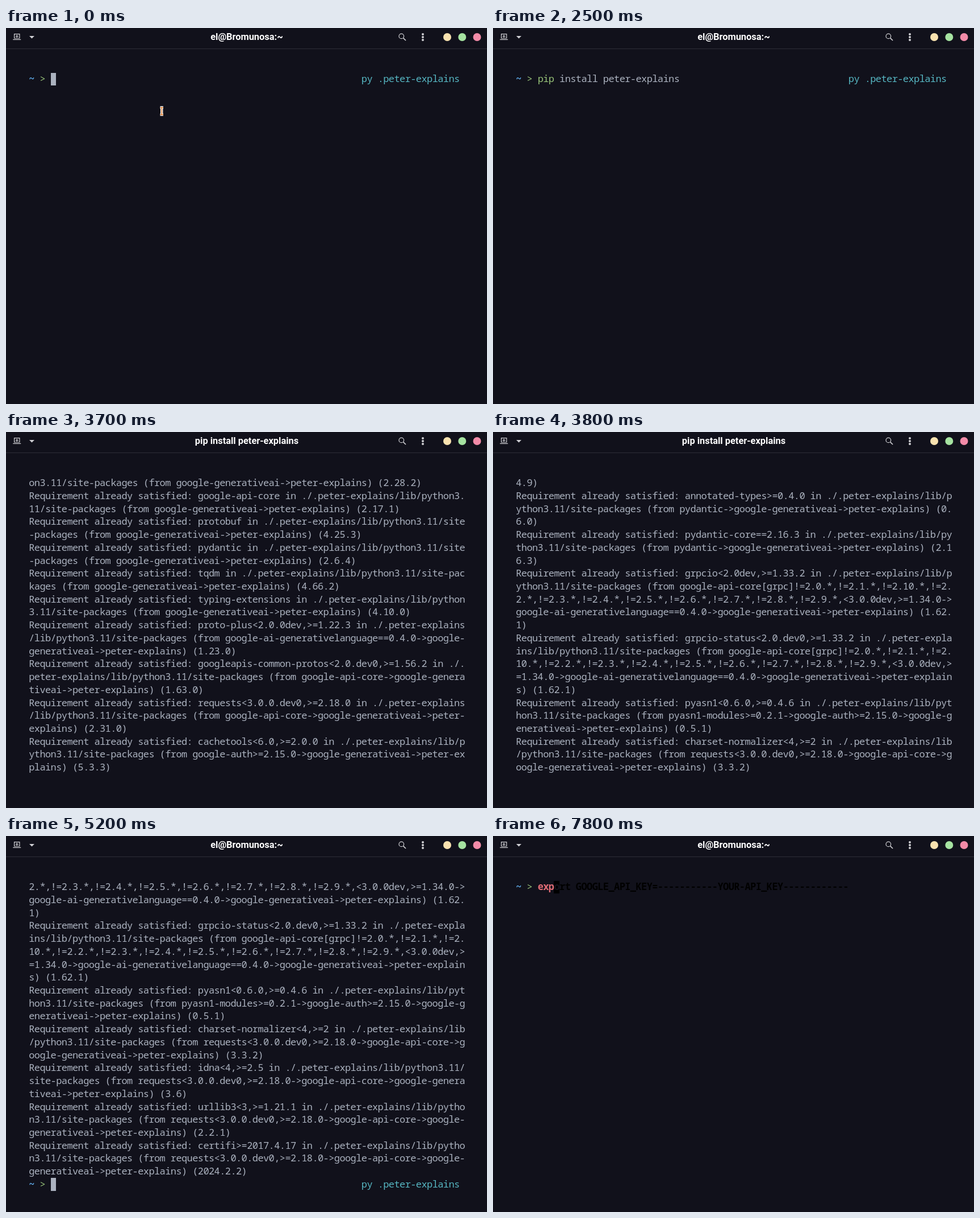
An HTML page for the animation above (8 s loop, 847 by 661 pixels).

```html
<!DOCTYPE html>
<html lang="en">
<head>
<meta charset="utf-8">
<title>Terminal</title>
<style>
  html, body { margin: 0; width: 100%; height: 100%; overflow: hidden; background: #11111b; }
  #stage { position: relative; width: 847px; height: 661px; overflow: hidden; background: #11111b; }
  svg { position: absolute; left: 0; top: 0; }
  #title { font: 700 16.4px Roboto, sans-serif; fill: #fff; text-anchor: middle; }
  #screen {
    position: absolute; left: 40.2px; top: 78.3px; margin: 0;
    font: 17px/22.72px "Noto Sans Mono", monospace; letter-spacing: -.6px;
    font-variant-ligatures: none; color: #abb2bf;
  }
  #cursor { position: absolute; width: 9.6px; height: 22.4px; }
  .dir { color: #61afef; font-weight: 700; }
  .ok { color: #98c379; }
  .bad { color: #e06c75; font-weight: 700; }
  .env { color: #56b6c2; }
  .ghost { color: #000; font-weight: 700; }
  .under { color: #11111b; }
</style>
</head>
<body>
<div id="stage">
  <div id="cursor"></div>
  <pre id="screen"></pre>
  <svg width="847" height="661" fill="none">
    <path d="M0 36.5H847" stroke="#2d2d37"/>
    <g stroke="#d0d0d4" stroke-width="1.2">
      <path d="M14.6 18V10.6H23.9V18ZM12.3 20.3H26.2M19.2 12V17M16.7 14.5H21.8"/>
      <circle cx="696.3" cy="14.4" r="4.3"/>
      <path d="M699.5 17.6L704 22" stroke-width="1.6"/>
    </g>
    <g fill="#d0d0d4">
      <path d="M41 14H50L45.5 18.5Z"/>
      <circle cx="734" cy="11" r="2"/><circle cx="734" cy="16" r="2"/><circle cx="734" cy="21" r="2"/>
    </g>
    <circle cx="777" cy="16" r="7" fill="#f9e2af"/>
    <circle cx="803.3" cy="16" r="7" fill="#a6e3a1"/>
    <circle cx="829.5" cy="16" r="7" fill="#f38ba8"/>
    <text id="title" x="424" y="21"></text>
    <g id="mouse">
      <path id="beam" d="M271.5 139.8H276.9M274.2 139.8V152.4M271.5 152.4H276.9" stroke="#fff" stroke-width="4.4" stroke-linejoin="round"/>
      <path d="M271.5 139.8H276.9M274.2 139.8V152.4M271.5 152.4H276.9" stroke="#d9803a" stroke-width="1.6"/>
    </g>
  </svg>
</div>
<script>
const LOOP = 8000, COLS = 80, CELL_W = 9.6, CELL_H = 22.72, LEFT = 40.2, TOP = 78.8;
const HOME = 'el@Bromunosa:~', INSTALL = 'pip install peter-explains';
const EXPORT = 'export GOOGLE_API_KEY=' + '-'.repeat(11) + 'YOUR-API_KEY' + '-'.repeat(12);

const $ = id => document.getElementById(id);
const esc = s => s.replace(/&/g, '&amp;').replace(/</g, '&lt;').replace(/>/g, '&gt;');
const span = (cls, s) => `<span class="${cls}">${esc(s)}</span>`;

// Prompt line: typed part, greyed-out suggestion, then the right-hand prompt if it fits.
function prompt(typed, full = typed) {
  const word = typed.split(' ')[0], rest = full.slice(typed.length);
  const used = 4 + full.length;
  return span('dir', '~') + ' ' + span('ok', '>') + ' ' +
    span(word === 'pip' ? 'ok' : 'bad', word) + esc(typed.slice(word.length)) +
    span('ghost under', rest.slice(0, 1)) + span('ghost', rest.slice(1)) +
    (used < 61 ? ' '.repeat(61 - used) + span('env', 'py .peter-explains') : '');
}

// Dependency chains, innermost last
const ROOT = 'peter-explains', GEN = 'google-generativeai->' + ROOT;
const LANG = 'google-ai-generativelanguage==0.4.0->' + GEN;
const AUTH = 'google-auth>=2.15.0->' + GEN, CORE = 'google-api-core->' + GEN;
const SKIP = [0, 1, 10, 2, 3, 4, 5, 6, 7, 8, 9].map(n => `!=2.${n}.*`).join();
const GRPC = `google-api-core[grpc]${SKIP},<3.0.0dev,>=1.34.0->${LANG}`;
const REQ = 'requests<3.0.0.dev0,>=2.18.0->' + CORE;

const packages = [
  ['peter-explains', '', '0.0.5'],
  ['colorama', ROOT, '0.4.6'],
  ['google-generativeai', ROOT, '0.4.1'],
  ['google-ai-generativelanguage==0.4.0', GEN, '0.4.0'],
  ['google-auth>=2.15.0', GEN, '2.28.2'],
  ['google-api-core', GEN, '2.17.1'],
  ['protobuf', GEN, '4.25.3'],
  ['pydantic', GEN, '2.6.4'],
  ['tqdm', GEN, '4.66.2'],
  ['typing-extensions', GEN, '4.10.0'],
  ['proto-plus<2.0.0dev,>=1.22.3', LANG, '1.23.0'],
  ['googleapis-common-protos<2.0.dev0,>=1.56.2', CORE, '1.63.0'],
  ['requests<3.0.0.dev0,>=2.18.0', CORE, '2.31.0'],
  ['cachetools<6.0,>=2.0.0', AUTH, '5.3.3'],
  ['pyasn1-modules>=0.2.1', AUTH, '0.3.0'],
  ['rsa<5,>=3.1.4', AUTH, '4.9'],
  ['annotated-types>=0.4.0', 'pydantic->' + GEN, '0.6.0'],
  ['pydantic-core==2.16.3', 'pydantic->' + GEN, '2.16.3'],
  ['grpcio<2.0dev,>=1.33.2', GRPC, '1.62.1'],
  ['grpcio-status<2.0.dev0,>=1.33.2', GRPC, '1.62.1'],
  ['pyasn1<0.6.0,>=0.4.6', 'pyasn1-modules>=0.2.1->' + AUTH, '0.5.1'],
  ['charset-normalizer<4,>=2', REQ, '3.3.2'],
  ['idna<4,>=2.5', REQ, '3.6'],
  ['urllib3<3,>=1.21.1', REQ, '2.2.1'],
  ['certifi>=2017.4.17', REQ, '2024.2.2']
];

// Terminal output after the first n packages, scrolled to the last 23 rows
function output(n) {
  const rows = [prompt(INSTALL)];
  for (const [name, from, version] of packages.slice(0, n)) {
    const line = `Requirement already satisfied: ${name} in ./.peter-explains/lib/python3.11/site-packages ` +
      (from && `(from ${from}) `) + `(${version})`;
    for (let i = 0; i < line.length; i += COLS) rows.push(esc(line.slice(i, i + COLS)));
  }
  return rows.slice(-23);
}

const edit = (typed, full = typed) => ({
  rows: [prompt(typed, full)], cursor: [0, 4 + typed.length], dark: full !== typed
});
const pip = n => edit(INSTALL.slice(0, n), INSTALL);
const busy = (rows, cursor) => ({ rows, cursor, title: INSTALL });
const command = [prompt(INSTALL)], done = output(packages.length);

const steps = [
  [0, { ...edit(''), mouse: true }],
  [200, pip(1)], [500, pip(2)], [700, pip(3)], [900, pip(4)],
  [1100, pip(5)], [1300, pip(6)], [1400, pip(7)],
  [1900, edit(INSTALL)],
  [2500, { rows: command }],
  [2800, { rows: command, cursor: [1, 0] }],
  [2900, busy(command, [1, 0])],
  [3400, busy(command)],
  [3600, busy(output(8))],
  [3700, busy(output(14))],
  [3800, busy(output(22))],
  [4000, busy(done, [23, 0])],
  [4500, { rows: done, cursor: [23, 0] }],
  [4800, { rows: [...done, prompt('')] }],
  [5200, { rows: [...done, prompt('')], cursor: [23, 4] }],
  [6100, edit('')],
  [6400, edit('r')],
  [6900, edit('')],
  [7800, edit('exp', EXPORT)]
];

function draw({ rows, cursor, dark, title = HOME, mouse }) {
  $('screen').innerHTML = rows.join('\n');
  $('title').textContent = title;
  $('mouse').style.display = mouse ? '' : 'none';
  const box = $('cursor').style;
  box.display = cursor ? '' : 'none';
  if (!cursor) return;
  box.left = LEFT + cursor[1] * CELL_W + 'px';
  box.top = TOP + cursor[0] * CELL_H + 'px';
  box.background = dark ? '#000' : '#abb2bf';
}

const start = performance.now();
let shown;
function tick() {
  const t = (performance.now() - start) % LOOP;
  const step = steps.filter(s => s[0] <= t).pop();
  if (step !== shown) draw((shown = step)[1]);
  requestAnimationFrame(tick);
}
tick();
</script>
</body>
</html>
```
